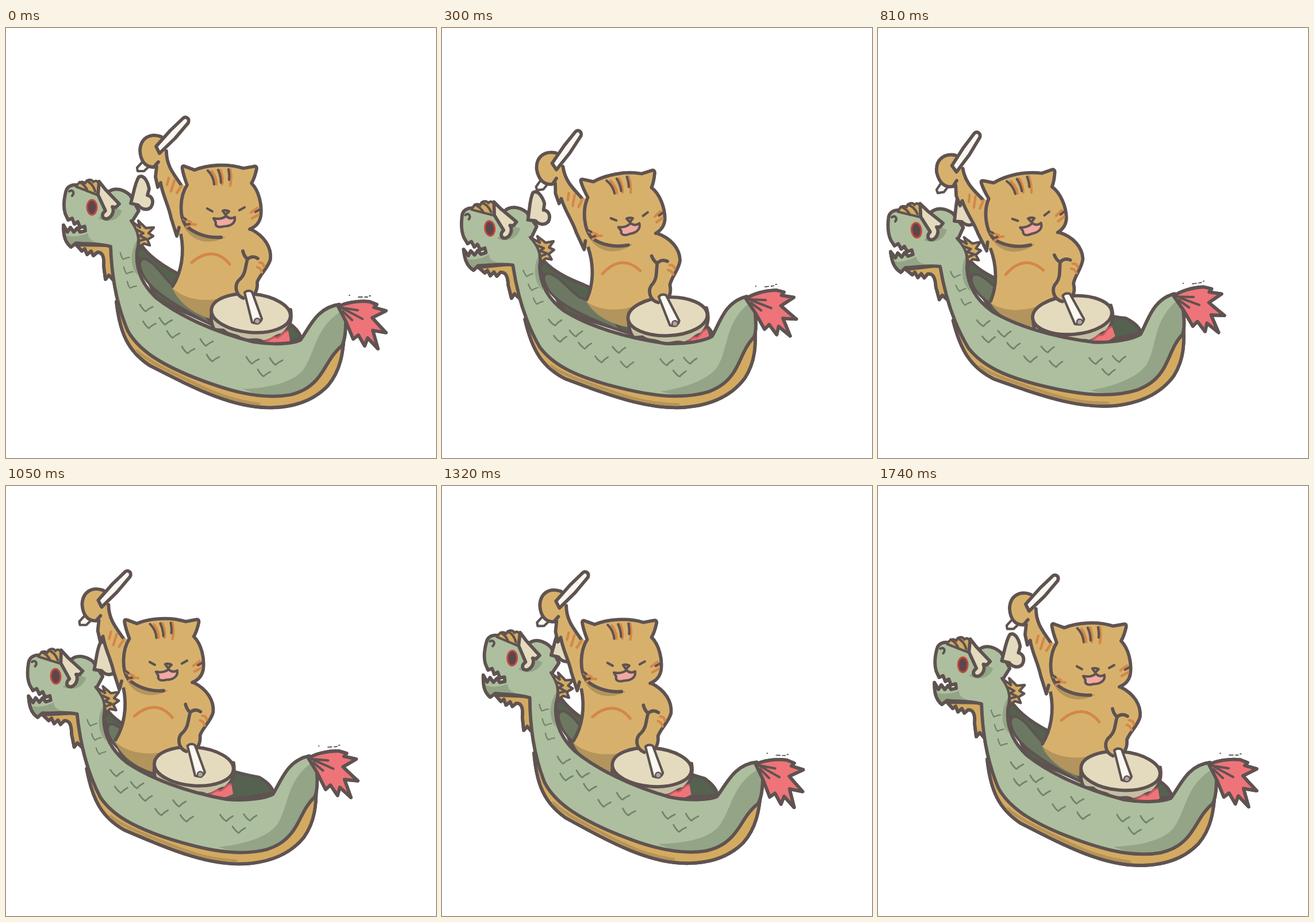
An HTML page for the animation above (1770 ms loop, 748 px wide and 748 px high).

```html
<!DOCTYPE html>
<html lang="en">
<head>
<meta charset="utf-8">
<title>Cat drumming in a dragon boat</title>
<style>
html, body { margin: 0; width: 100%; height: 100%; overflow: hidden; background: #fff; }
svg { display: block; width: 100vw; height: 100vh; }
path, ellipse, use { stroke-linecap: round; stroke-linejoin: round; }
.ink { stroke: #5f5351; stroke-width: 5.8; }
.thin { stroke-width: 4.2; }
.line { fill: none; }
.green { fill: #adbf9f; }
.moss { fill: #94a486; }
.deep { fill: #55624f; }
.hold { fill: #6c7862; }
.gold { fill: #d3aa60; }
.fur { fill: #d7b16c; }
.tan { fill: #b3945c; }
.cream { fill: #e4dbbf; }
.side { fill: #c4bfa3; }
.red { fill: #ee7479; }
.white { fill: #fbf8f1; }
.stripe { fill: none; stroke: #d48748; stroke-width: 4.4; }
.scale { fill: none; stroke: #718468; stroke-width: 2.8; }
</style>
</head>
<body>
<svg viewBox="0 0 748 748">
<defs>
  <path id="hull" d="M104 285C106 275 116 271 126 274L160 275L178 285C190 276 205 281 216 291L231 318L219 337
    C233 352 233 370 228 388C225 420 236 446 262 470C300 500 360 528 430 546C465 552 500 549 512 543
    C528 522 540 486 580 481L591 508C591 530 589 545 584 553C563 570 556 595 540 612C526 628 510 634 495 638
    C440 648 380 629 320 605C270 584 232 562 212 527C196 490 184 440 182 380C160 374 135 376 122 374
    L113 381C102 372 100 360 100 343L107 355L112 347L118 355L124 348L129 355L138 353L137 345L129 347L125 337
    L119 341L115 331L108 334L103 323C99 310 101 297 104 285Z"/>
  <path id="scale" d="M-11 -6Q-6 3 -1 6Q4 1 11 -2"/>
  <clipPath id="low"><rect x="0" y="340" width="748" height="400"/></clipPath>
</defs>

<g class="boat">
  <path class="deep ink" d="M226 390L237 380C250 398 275 415 300 428C370 470 440 500 490 512C502 520 510 528 514 541L430 548L262 472Z"/>
  <path class="hold ink thin" d="M291 449C272 432 262 410 243 402C234 400 231 408 234 418C240 445 270 470 357 516L330 470Z"/>
  <g id="dragon">
    <path class="gold ink" d="M122 377L132 388L137 384L141 394L148 388L152 396L159 390C169 390 171 400 170 414L173 437L179 430L188 440L184 378Z"/>
    <path class="gold ink" d="M192 476C198 530 212 562 250 587C330 628 400 664 468 660C512 658 540 643 560 622C580 598 588 570 589 512L540 540L512 560C430 570 300 530 205 480Z"/>
    <path class="line" stroke="#b5945a" stroke-width="5" d="M228 562C250 582 290 600 340 624C370 638 400 649 440 654"/>
    <use href="#hull" class="green"/>
    <path class="moss" d="M588 490L591 510C591 530 589 545 584 553C563 570 556 595 540 612C520 633 490 638 470 639C445 640 425 634 412 628
      C455 626 495 618 515 597C540 565 535 520 588 490Z"/>
    <path class="moss" d="M230 366C232 384 225 410 229 430C216 418 214 388 230 366ZM160 331C178 340 196 335 202 318L186 310Z"/>
    <path class="moss" d="M103 360C116 365 130 362 143 357C142 368 154 375 175 375L122 374L113 381Z"/>
    <use href="#hull" class="line ink"/>
    <g id="scales"></g>

    <path class="gold ink thin" d="M122 276C126 268 132 265 138 270C140 263 149 262 152 268C157 263 163 268 162 278L158 290Z"/>
    <path class="line ink thin" d="M128 268Q138 273 142 284M140 266Q151 270 155 284M110 284C116 280 120 287 115 292"/>
    <ellipse cx="149.500" cy="312" rx="8.500" ry="13" fill="#5b474b" stroke="#c8473d" stroke-width="3"/>
    <path class="cream ink" d="M162 267L173 281L197 306L191 312L185 311C189 319 184 330 175 332C167 332 165 324 173 318L160 290Z"/>
    <path class="gold ink thin" d="M217 335L233 347L230 335L243 348L257 347L248 357L256 362L246 368L250 378L240 375L231 381C233 362 226 348 217 335Z"/>
    <path class="line ink thin" d="M226 350L239 357L232 361L244 367L233 370"/>

    <path class="red ink" d="M578 485C590 478 612 474 632 476L645 481L640 486L661 492L637 504L646 514L661 530L638 526L647 558L629 539L624 553L613 534L604 541L592 512Z"/>
    <path class="line ink thin" d="M580 486L612 491M586 493L602 508M586 488L620 506"/>
    <path class="cream ink" d="M217 305C222 288 224 270 231 259C240 254 247 268 249 280L246 291C255 293 258 303 252 312C244 319 234 314 230 308Z"/>
    <path class="line" stroke="#4b4342" stroke-width="1.300" d="M597 465h1M613 468h7M624 468h5M632 466h2"/>
  </g>
</g>

<g class="cat">
  <path class="fur" d="M303 350C312 392 306 425 289 452L330 495L380 512L420 470L436 440L430 350Z"/>
  <path class="tan" d="M289 452C310 472 345 477 375 470L380 512L350 504C325 495 300 478 289 452Z"/>
  <path class="line ink" d="M304 358C311 392 305 425 290 449"/>
  <path class="white ink thin" d="M240 230L228 243L229 249L240 249L254 236Z"/>
  <path class="fur" d="M270 189C252 182 233 192 233 215C234 232 244 242 262 240L262 275L268 270L280 312L297 360L312 356L312 275L294 262L280 218Z"/>
  <path class="line ink" d="M270 189C251 182 234 191 233 213C234 231 242 242 257 242L265 233M262 241L260 259L264 277L269 269C272 290 283 309 287 330L297 362L301 347M279 214C279 240 292 254 304 272"/>
  <path class="stripe" d="M283 261L280 273M293 265L287 284M305 275L297 287"/>
  <path class="white ink" d="M308 157C313 153 320 157 317 165L294 192L267 218L261 206L286 178Z"/>

  <path class="tan" d="M308 342C318 366 345 382 382 364L350 352Z"/>
  <path id="face" class="fur" d="M424 350C434 346 441 338 443 328C446 308 440 283 427 270C432 262 434 254 436 245Q436 239 430 241L413 244C385 235 350 238 328 247L312 241Q305 238 307 246C308 254 311 262 315 273C302 293 301 328 313 344C326 356 348 366 374 364"/>
  <use href="#face" class="ink"/>
  <path class="stripe" d="M358 249Q366 260 366 272M373 247Q378 260 376 272M390 246Q393 260 390 274"/>
  <path class="line ink thin" d="M351 248Q361 258 362 272M369 247Q374 258 374 269M387 246Q389 256 388 264"/>
  <path class="stripe" d="M309 332L322 338M314 346Q320 340 330 342M437 313L426 321M439 325L428 331"/>
  <path class="line ink thin" d="M307 329L313 333M312 342L319 341M441 316L434 320"/>
  <path class="line ink thin" d="M350 314L359 319M406 317L415 312M377 318Q382 316 388 319L382 325Z"/>
  <path class="ink thin" fill="#f1a9a1" d="M361 331C370 333 378 331 383 327C388 332 393 332 398 329C400 341 388 345 379 345C370 348 363 345 365 338Z"/>
  <path class="line" stroke="#d48748" stroke-width="5" d="M323 408C346 388 370 387 389 411"/>

  <path class="side ink" d="M358 492C355 508 359 520 363 525L378 526C387 536 398 532 408 540C420 548 436 538 447 546C462 546 468 534 480 534C490 526 499 514 495 490Z"/>
  <path class="red" d="M446 547C460 544 464 534 471 538C478 537 481 527 491 526L494 544C480 552 465 553 450 552Z"/>
  <path class="line" stroke="#c9575f" stroke-width="3" d="M447 547C460 544 464 535 471 539C478 538 481 528 490 527"/>
  <ellipse class="cream ink" cx="426" cy="496" rx="69" ry="33.500" transform="rotate(5 426 496)"/>

  <path class="fur" d="M428 352C450 364 461 382 460 402C456 418 442 428 437 444L430 464L412 472C399 462 396 448 408 436L418 404L410 380Z"/>
  <path class="line ink" d="M426 350C450 362 462 382 460 402C456 418 442 428 437 442C438 454 434 463 428 466M412 388Q414 397 420 402C416 416 417 427 408 436C396 445 398 464 413 470M420 402C426 397 432 397 438 401"/>
  <path class="stripe" d="M441 408Q448 408 449 415M437 416Q444 418 445 425"/>
  <path class="white ink thin" d="M415 460Q421 455 428 459L445 506Q441 517 428 512Z"/>
  <ellipse cx="437" cy="510" rx="5" ry="5" fill="#aaa5a2" stroke="#625755" stroke-width="2.500"/>
</g>

<g class="boat"><g clip-path="url(#low)"><use href="#dragon"/></g></g>
</svg>

<script>
const LOOP = 1770, STEP = 30;

// Key poses as offsets from rest; each part leaves rest and returns to it
const times = [0, 300, 570, 810, 1050, 1320, LOOP];
const parts = {
  boat: { home: [405, 421], x: [-55.5, -71.5, -70.5, -56, -30.5], y: [6.5, 6, 5, 1, -5.5], turn: [-6.6, -9.1, -7.6, -4, 1.6] },
  cat: { home: [376, 333.5], x: [-54, -100.5, -113.5, -100, -62], y: [13.5, 17.5, 13.5, -8, -6.5], turn: [-7.4, -14, -9.2, -0.3, -0.4] }
};

function addScales() {
  let marks = "";
  const add = (x, y, size = 1, turn = 0) =>
    marks += `<use href="#scale" class="scale" transform="translate(${x} ${y}) rotate(${turn}) scale(${size})"/>`;
  for (let i = 0; i < 3; i++) add(206 + 6 * i, 398 + 25 * i, 0.8, 16);
  for (let i = 0; i < 2; i++) {
    for (let j = 0; j < 2; j++) add(291 + 58 * i + (26 - 15 * i) * j, 533 + 14 * i + 27 * j);
  }
  const trio = (x, y, turn) => {
    const c = Math.cos(turn), s = Math.sin(turn);
    for (const [dx, dy] of [[0, 0], [41, 2], [20, 22]]) add(x + dx * c - dy * s, y + dx * s + dy * c);
  };
  trio(244, 487, 0.55);
  trio(429, 578, 0);
  document.getElementById("scales").innerHTML = marks;
}

// Smooth curve through the poses, open at both ends
function at(t, poses) {
  const p = [0, ...poses, 0], last = p.length - 1;
  const slope = k => {
    const a = Math.max(k - 1, 0), b = Math.min(k + 1, last);
    return (p[b] - p[a]) / (times[b] - times[a]);
  };
  const i = times.findIndex(end => t < end) - 1;
  const h = times[i + 1] - times[i], u = (t - times[i]) / h, v = 1 - u;
  return p[i] * v * v * (1 + 2 * u) + p[i + 1] * u * u * (3 - 2 * u)
    + h * u * v * (v * slope(i) - u * slope(i + 1));
}

function place(name, t) {
  const { home: [hx, hy], x, y, turn } = parts[name];
  const move = `translate(${at(t, x)} ${at(t, y)}) rotate(${at(t, turn)} ${hx} ${hy})`;
  for (const g of document.getElementsByClassName(name)) g.setAttribute("transform", move);
}

addScales();
const start = performance.now();
function draw(now) {
  const t = Math.floor(Math.max(0, now - start) % LOOP / STEP) * STEP;
  place("boat", t);
  place("cat", t);
  requestAnimationFrame(draw);
}
draw(start);
</script>
</body>
</html>
```
